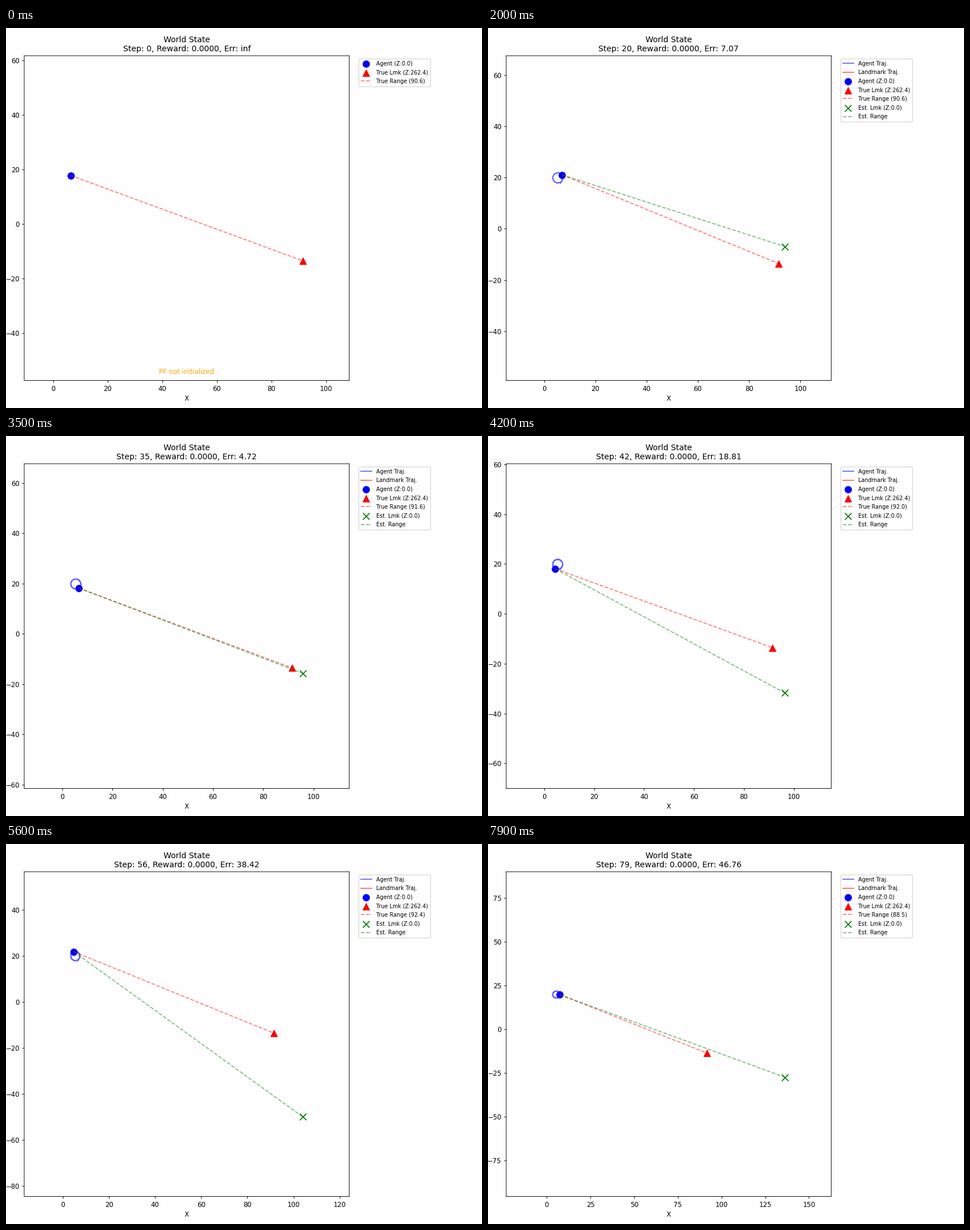
These frames come from a looping animation (837x669 px, 8 s). A matplotlib script:

```python
import numpy as np
import matplotlib.pyplot as plt
from matplotlib.animation import FuncAnimation

W, H, DPI = 837, 669, 83.7
STEPS = 80
LMK = np.array([91.5, -13.6])
ORBIT, RADIUS = np.array([5.4, 19.85]), 2.05
TURN, PHASE = 42.1, -447  # degrees per step, starting angle
PAPER = "#fefefe"

plt.rcParams.update({"font.family": "DejaVu Sans", "axes.facecolor": PAPER})


def polar(r, deg):
    a = np.radians(deg)
    return np.column_stack([r * np.cos(a), r * np.sin(a)])


# The agent circles counter-clockwise after a short first step.
steps = np.arange(STEPS)
agent = ORBIT + polar(RADIUS, PHASE + TURN * steps)
agent[0] = 6.45, 17.7

# The estimate drifts between key points: step, error, direction of error.
at, size, angle = np.transpose([
    (0, 0, 0), (13, 3.18, -64), (27, 16.51, 78.1), (42, 18.81, -74.9),
    (56, 38.42, -71), (69, 21.34, 127.2), (79, 46.76, -17.3)])
drift = np.column_stack([np.interp(steps, at, c) for c in polar(size, angle).T])
est = LMK + drift
err = np.hypot(*drift.T)

# Range readings are noisy once the agent moves.
noise = np.random.default_rng(4).normal(0, 1, STEPS) * (steps > 0)
reading = np.hypot(*(agent - LMK).T) + noise

fig = plt.figure(figsize=(10, 7.99284), dpi=DPI, facecolor=PAPER)
ax = fig.add_axes([32 / W, 1 - 620.5 / H, 571.5 / W, 571.6 / H])


def link(a, b, color, label):
    ax.plot(*np.array([a, b]).T, color=color, ls="--", alpha=0.5, label=label)


def fit_view(points):
    lo, hi = points.min(axis=0), points.max(axis=0)
    mid, half = (lo + hi) / 2, 0.7 * (hi - lo).max()
    ax.set_xlim(mid[0] - half, mid[0] + half)
    ax.set_ylim(mid[1] - half, mid[1] + half)


def update(i):
    ax.clear()
    pos, ready = agent[i], i > 0
    seen = [agent[:i + 1], [LMK]]
    if ready:
        ax.plot(*agent[:i + 1].T, "b-", alpha=0.6, label="Agent Traj.")
        ax.plot(*np.tile(LMK, (i + 1, 1)).T, "r-", alpha=0.6,
                label="Landmark Traj.")
    ax.scatter(*pos, c="blue", s=100, label="Agent (Z:0.0)")
    ax.scatter(*LMK, c="red", marker="^", s=100, label="True Lmk (Z:262.4)")
    link(pos, LMK, "red", f"True Range ({reading[i]:.1f})")
    if ready:
        ax.scatter(*est[i], c="green", marker="x", s=100,
                   label="Est. Lmk (Z:0.0)")
        link(pos, est[i], "green", "Est. Range")
        seen.append([est[i]])
    else:
        ax.text(0.5, 0.02, "PF not initialized", color="orange", ha="center",
                transform=ax.transAxes)
    fit_view(np.vstack(seen))
    for spine in ax.spines.values():
        spine.set_snap(False)
    ax.set_xlabel("X", labelpad=3.5)
    shown = f"{err[i]:.2f}" if ready else "inf"
    ax.set_title(f"World State\nStep: {i}, Reward: 0.0000, Err: {shown}",
                 pad=6.5, linespacing=1.25)
    ax.legend(loc="upper left", bbox_to_anchor=(1.02, 1), fontsize="small",
              labelspacing=0.575)
    return []


anim = FuncAnimation(fig, update, frames=STEPS, interval=100, repeat=True,
                     repeat_delay=0, init_func=lambda: update(0))
plt.show()
```
